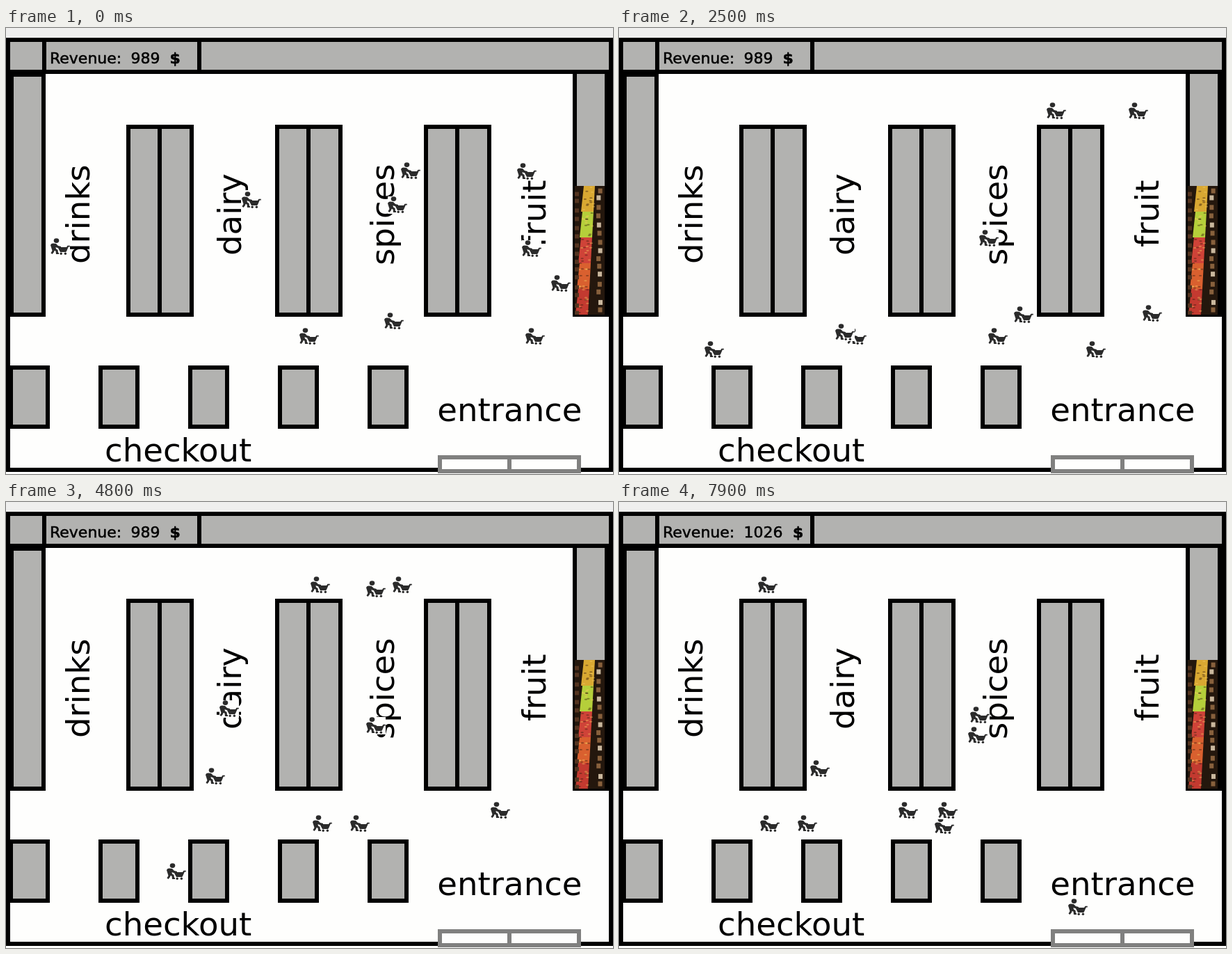
These frames come from a looping animation (873 by 641 pixels, 8000 ms). An HTML page:

```html
<!DOCTYPE html>
<html lang="en">
<head>
<meta charset="utf-8">
<title>Supermarket</title>
<style>
  html, body { margin: 0; width: 100%; height: 100%; overflow: hidden; background: #fefefd; }
  svg { display: block; width: 100%; height: 100%; }
  text { font-family: "DejaVu Sans", sans-serif; font-size: 46.67px; }
  .sum text { font-size: 22px; stroke: #000; stroke-width: .5px; }
</style>
</head>
<body>
<svg viewBox="0 0 873 641">
  <defs>
    <g id="shopper">
      <rect width="28" height="25" fill="#fefefd"/>
      <g fill="#2b2b2b">
        <ellipse cx="8.5" cy="3.6" rx="3.8" ry="3.4"/>
        <path d="M0 10Q1 7.5 4 7.6L8 8 11 11 15 12V14H10L7.5 13 8 15.5 10.5 17 11 21H12V23H8L7.5 18.5 5.5 18 5 20 2.5 23 .5 21.5 2.5 18Z"/>
        <path d="M10 12.5H14L15 13H23L24.5 10.8H27.8V12.5H25.8L23 19 22 20H14Z"/>
        <circle cx="15.2" cy="22.2" r="1.7"/>
        <circle cx="21.4" cy="22.2" r="1.7"/>
      </g>
    </g>
    <clipPath id="crate"><rect x="818" y="227" width="43" height="185"/></clipPath>
  </defs>
  <g id="store"></g>
  <g id="produce" clip-path="url(#crate)"></g>
  <g>
    <text transform="translate(120 339) rotate(-90)">drinks</text>
    <text transform="translate(338 327) rotate(-90)">dairy</text>
    <text transform="translate(558 341) rotate(-90)">spices</text>
    <text transform="translate(776 315) rotate(-90)">fruit</text>
    <text x="142" y="623">checkout</text>
    <text x="620.3" y="565">entrance</text>
  </g>
  <g class="sum">
    <text x="63" y="51">Revenue:</text>
    <text id="amount" x="179.5" y="51"></text>
    <text id="currency" y="51" font-weight="bold">$</text>
  </g>
  <g id="people"></g>
</svg>
<script>
const NS = "http://www.w3.org/2000/svg";
const byId = id => document.getElementById(id);

function make(tag, attrs) {
  const el = document.createElementNS(NS, tag);
  for (const key in attrs) el.setAttribute(key, attrs[key]);
  return el;
}
const add = (parent, tag, attrs) => byId(parent).appendChild(make(tag, attrs));
const box = (x, y, x2, y2, fill, parent = "store") =>
  add(parent, "rect", { x, y, width: x2 - x, height: y2 - y, fill });

const GREY = "#b2b2b0", FLOOR = "#fefefd", BLACK = "#000", DOOR = "#80807f", LINE = 6;

function framed(x, y, x2, y2, fill = GREY, edge = BLACK) {
  box(x, y, x2, y2, edge);
  box(x + LINE, y + LINE, x2 - LINE, y2 - LINE, fill);
}

function drawStore() {
  box(0, 0, 873, 14, "#efefee");
  framed(0, 14, 873, 638, FLOOR);
  framed(0, 14, 873, 66);
  framed(52, 14, 281, 66);
  framed(5, 64, 57, 415);
  framed(815, 60, 867, 415);
  for (let i = 0; i < 3; i++) {
    const x = 173 + i * 214;
    framed(x, 139, x + 52, 415);
    framed(x + 45, 139, x + 97, 415);
  }
  for (let i = 0; i < 5; i++) framed(4 + i * 129, 485, 63 + i * 129, 576);
  framed(621, 614, 727, 640, FLOOR, DOOR);
  framed(721, 614, 827, 640, FLOOR, DOOR);
}

function seeded(seed) {
  return () => (seed = seed * 16807 % 2147483647) / 2147483647;
}

// A fruit display: leaning colour bands with dark gaps and pale price tags.
function drawProduce() {
  const random = seeded(7);
  const bands = ["#d9a832", "#b5cf3a", "#cf4338", "#d9602f", "#c33a30"];
  const height = 185 / bands.length;
  box(818, 227, 861, 412, "#24170d", "produce");
  bands.forEach((fill, i) => {
    const x = 831 - i * 2, y = 227 + i * height;
    add("produce", "path", { d: `M${x} ${y}h16l-2 ${height}h-18z`, fill });
    for (let k = 0; k < 14; k++)
      add("produce", "ellipse", {
        cx: x + random() * 15, cy: y + random() * height,
        rx: 2.2, ry: 1, fill: k % 2 ? "#3a1c10" : "#f3c860", opacity: 0.45
      });
    for (let k = 0; k < 3; k++) {
      const top = y + k * 12 + random() * 4, left = 848 + random() * 4;
      box(left, top, left + 6, top + 7, k % 2 ? "#c9b79d" : "#87603c", "produce");
      box(818, top + 5, 824, top + 11, "#543420", "produce");
    }
  });
}

const STEP = 100, STEPS = 80, SALE_STEP = 73;

// Pixels walked by everyone: brisk at first, then a steady pace.
const walked = step => 8.47 * Math.min(step, 19) + 7.69 * Math.max(step - 19, 0);

// Cross aisles: along the back wall, past the shelves, in front of the tills.
const BACK = 107, FRONT = 431, TILLS = 450;
const shoppers = [
  { route: `M64 302V${TILLS}H231V525`, until: SALE_STEP },
  { route: `M339 235V${FRONT}H307V280V${FRONT}H275V300` },
  { route: `M568 193V${TILLS}H150` },
  { route: `M549 242V${FRONT}H518V288V${FRONT}H300` },
  { route: `M735 194V${BACK}H100` },
  { route: `M742 305V${BACK}H505V${FRONT}` },
  { route: `M784 355V${TILLS}H150` },
  { route: `M544 409V400V${FRONT}H518V${BACK}H502V${FRONT}` },
  { route: `M422 ${FRONT}H311V380V${FRONT}H287V333V${TILLS}H454V525` },
  { route: `M747 ${FRONT}H753V347V${FRONT}V354V${FRONT}H300` },
  { route: `M646 613V${FRONT}`, from: SALE_STEP, delay: 579 }
];

function render(time) {
  const step = Math.floor(time / STEP) % STEPS;
  for (const { path, el, delay = 0, from = 0, until = STEPS } of shoppers) {
    const { x, y } = path.getPointAtLength(Math.max(0, walked(step) - delay));
    el.setAttribute("transform", `translate(${Math.round(x)} ${Math.round(y)})`);
    el.setAttribute("visibility", step >= from && step < until ? "visible" : "hidden");
  }
  const sold = step >= SALE_STEP;
  byId("amount").textContent = sold ? "1026" : "989";
  byId("currency").setAttribute("x", sold ? 250 : 235.5);
}

drawStore();
drawProduce();
for (const s of shoppers) {
  s.path = make("path", { d: s.route });
  s.el = add("people", "use", { href: "#shopper" });
}

const start = performance.now();
function tick() {
  render(performance.now() - start);
  requestAnimationFrame(tick);
}
tick();
</script>
</body>
</html>
```
